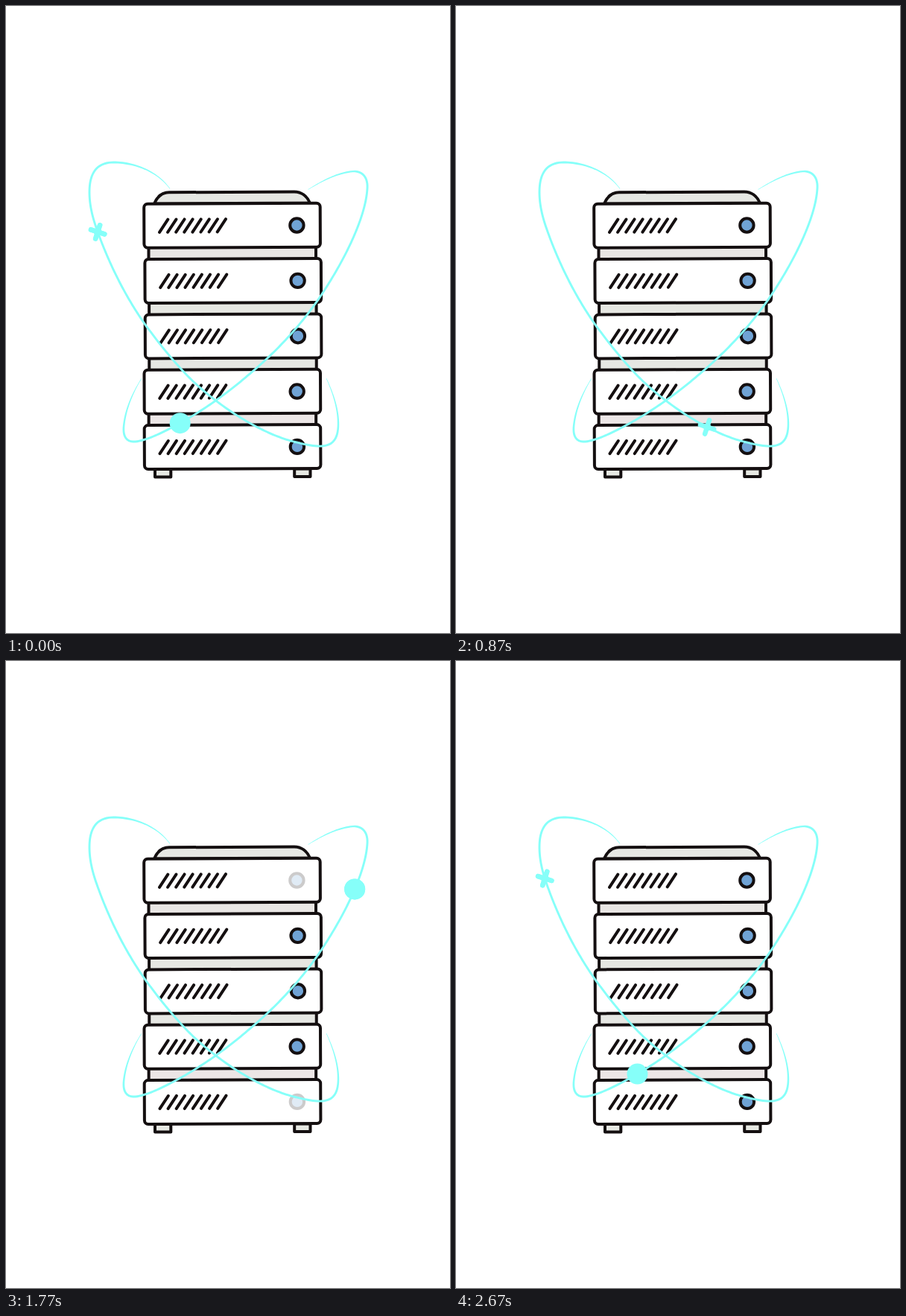
Animation, 596 px wide and 842 px high, one loop 2700 ms. Source, as an HTML page:

```html
<!DOCTYPE html>
<html lang="en">
<head>
<meta charset="utf-8">
<title>Server orbit</title>
<style>
  html, body { margin: 0; width: 100%; height: 100%; overflow: hidden; background: #fff; }
  svg { display: block; width: 596px; height: 842px; }
  .ink { stroke: #140f10; stroke-width: 4; stroke-linejoin: round; stroke-linecap: round; }
  .cyan { fill: #86fff9; }
  .star path { fill: none; stroke: #86fff9; stroke-width: 6.5; stroke-linecap: round; }
  .mover { offset-rotate: 0deg; animation: orbit 2700ms linear infinite; }
  .front.ball { animation: orbit 2700ms linear infinite, ballFront 2700ms step-end infinite; }
  .front.star { animation: orbit 2700ms linear infinite, starFront 2700ms step-end infinite; }
  .blink { animation: blink 2700ms linear infinite; }
  @keyframes orbit { from { offset-distance: 0%; } to { offset-distance: 100%; } }
  @keyframes ballFront {
    0% { visibility: visible; }
    16.2% { visibility: hidden; }
    49.5%, 100% { visibility: visible; }
  }
  @keyframes starFront {
    0% { visibility: visible; }
    50.6% { visibility: hidden; }
    81.4%, 100% { visibility: visible; }
  }
  @keyframes blink {
    0%, 20% { opacity: 1; }
    25.5% { opacity: .2; }
    31%, 60% { opacity: 1; }
    65.5% { opacity: .2; }
    71%, 100% { opacity: 1; }
  }
</style>
</head>
<body>
<svg viewBox="0 0 596 842">
  <defs>
    <g id="ball"><circle class="cyan" r="14"/></g>
    <g id="star" class="star">
      <g transform="rotate(18)">
        <path d="M0-9.6V9.6M-9.6 0H9.6"/>
        <circle class="cyan" r="5.2"/>
      </g>
    </g>
  </defs>
  <use href="#ball" class="mover ball"/>
  <use href="#star" class="mover star"/>
  <g id="server"></g>
  <g id="trails" class="cyan"></g>
  <use href="#ball" class="mover front ball"/>
  <use href="#star" class="mover front star"/>
</svg>
<script>
  const NS = 'http://www.w3.org/2000/svg';
  const $ = s => document.querySelector(s);

  function add(parent, tag, attrs) {
    const el = document.createElementNS(NS, tag);
    for (const k in attrs) el.setAttribute(k, attrs[k]);
    return parent.appendChild(el);
  }

  function box(x, y, width, height, fill, rx = 0) {
    return add(server, 'rect', { class: 'ink', x, y, width, height, fill, rx });
  }

  // Server rack
  const server = $('#server');
  const PITCH = 74.35;
  const shift = [0, 1.2, 1.5, 0.3, 0.5];
  const gapFill = ['#e9e6e4', '#e6e7e2', '#e6e7e3', '#ece6e6'];

  add(server, 'path', {
    class: 'ink', fill: '#e6e7e3',
    d: 'M199 265.5C203 256 210 250.3 219 250.3L387 249.5C396 249.5 404 255 408 264.5Z'
  });
  box(200, 622, 21.3, 10.5, '#e7e9e3');
  box(387.2, 621.5, 21.3, 10.5, '#e7e9e3');
  gapFill.forEach((fill, i) => box(191.5 + shift[i] / 2, 323 + i * PITCH, 224.5, 18, fill));

  shift.forEach((dx, i) => {
    const y = 265.2 + i * PITCH;
    box(185.3 + dx, y, 236.5, 59, '#fff', 5)
      .setAttribute('transform', `rotate(-.25 304 ${y + 29})`);
    let d = '';
    for (let k = 0; k < 8; k++) d += `M${206 + dx + k * 11.1} ${y + 38.6 - k * 0.06}l11.3-17.2`;
    add(server, 'path', { class: 'ink', d, fill: 'none' });
    add(server, 'circle', {
      class: i % 4 ? 'ink' : 'ink blink',
      cx: 390.4 + dx, cy: y + 29.3, r: 9.2, fill: '#70a3d5'
    });
  });

  // Closed orbits, each starting at its mover's position at time zero
  const orbits = {
    star: {
      d: 'M123 303C138 345 160 390 187 428C206 454 226 479 249 502C292 543 347 576 390 586' +
         'C426 595 446 595 446 561C446 542 440 522 430 500C405 445 268 301 219 244' +
         'C204 224 177 211 147 210C122 209 112 224 112 250C112 267 116 284 123 303Z',
      from: -0.186, to: 0.506
    },
    ball: {
      d: 'M234 560C212 572 190 583 174 585C162 586 157 579 158 565C160 543 169 521 182 500' +
         'C215 445 330 300 403 248C430 231 450 223 467 222C480 222 486 232 485 245' +
         'C483 282 457 337 424 387C396 429 363 464 326 495C297 520 266 542 234 560Z',
      from: -0.505, to: 0.162
    }
  };

  // Front half of an orbit as a ribbon that thins out at both ends
  function trail({ d, from, to }) {
    const path = document.createElementNS(NS, 'path');
    path.setAttribute('d', d);
    const len = path.getTotalLength();
    const at = s => path.getPointAtLength((s + len) % len);
    const start = from * len, end = to * len, steps = 240;
    const left = [], right = [];
    for (let i = 0; i <= steps; i++) {
      const s = start + (end - start) * i / steps;
      const p = at(s), a = at(s - 1), b = at(s + 1);
      const w = 0.3 + 1.15 * Math.min(1, (s - start) / 80, (end - s) / 80);
      const n = Math.hypot(b.x - a.x, b.y - a.y) || 1;
      const nx = (a.y - b.y) / n * w, ny = (b.x - a.x) / n * w;
      left.push([p.x + nx, p.y + ny]);
      right.unshift([p.x - nx, p.y - ny]);
    }
    add($('#trails'), 'polygon', { points: left.concat(right).join(' ') });
  }

  for (const name in orbits) {
    trail(orbits[name]);
    document.querySelectorAll('.mover.' + name).forEach(el => {
      el.style.offsetPath = `path("${orbits[name].d}")`;
    });
  }
</script>
</body>
</html>
```
